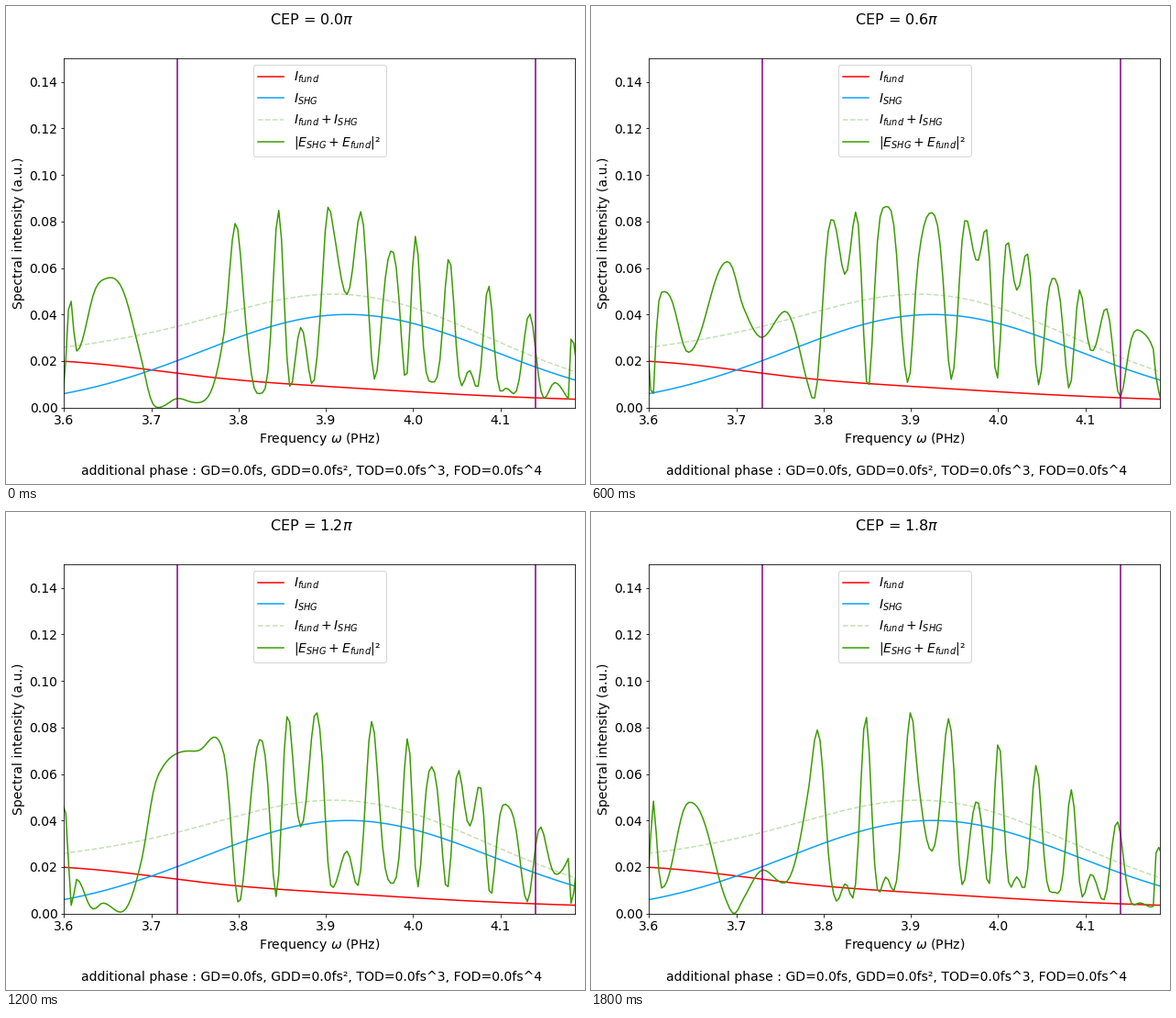
Recreate the animation shown at these times as a matplotlib script. Size 632x521 px, loop 2 s.

```python
import numpy as np
import matplotlib.pyplot as plt
from matplotlib.animation import FuncAnimation

W, H, DPI = 632, 521, 72
FRAMES, INTERVAL = 10, 200
LEFT, BOTTOM, AX_W, AX_H = 63.4, 437.7, 558, 380.5
GREEN = "#3a9a00"

plt.rcParams.update({"font.family": "DejaVu Sans", "font.size": 14})


def ease_through(x, points):
    """Smooth path through key points that is level at each turning point."""
    xk, yk = np.array(points).T
    h = np.diff(xk)
    d = np.diff(yk) / h
    left, right = d[:-1], d[1:]
    same = np.maximum(left * right, 0)
    inner = 2 * same / (abs(left) + abs(right)) * np.sign(left)
    m = np.concatenate([d[:1], inner, d[-1:]])
    i = np.clip(np.searchsorted(xk, x) - 1, 0, len(h) - 1)
    t = (x - xk[i]) / h[i]
    return (yk[i] * (1 + 2 * t) * (1 - t) ** 2
            + yk[i + 1] * t * t * (3 - 2 * t)
            + h[i] * (m[i] * t * (1 - t) ** 2 - m[i + 1] * t * t * (1 - t)))


# Turning points of the relative phase, in units of pi.
TURNS = [
    (3.5987, -.9), (3.605, -.25), (3.6081, .175), (3.6144, .531),
    (3.645, .045), (3.688, .6), (3.708, 1), (3.73, 1.144), (3.755, 1.065),
    (3.782, 1.4), (3.8095, 2.6), (3.825, 2.993), (3.8715, .612),
    (3.893, 1.4), (3.9085, 2.23), (3.924, 2.5), (3.976, .272),
    (4.0215, 2.986), (4.0645, .752), (4.107, 3.14), (4.163, .67),
    (4.1778, .88), (4.1809, 2.03), (4.1872, 1.6),
]

freq = 3.605 + .00313 * np.arange(-2, 187)
phase = ease_through(freq, TURNS)
u = freq - 3.6
fund = (.0199 * np.exp(-2.27 * u - 1.11 * u ** 2)
        + .001 * np.sin(21 * u) * np.exp(-6 * u))
shg = .04 * np.exp(-(freq - 3.925) ** 2 / .0557)


def interference(cep):
    return fund + shg + 2 * np.sqrt(fund * shg) * np.cos(np.pi * (cep - phase))


fig = plt.figure(figsize=(W / DPI, H / DPI), dpi=DPI, facecolor="white")
ax = fig.add_axes([LEFT / W, 1 - BOTTOM / H, AX_W / W, AX_H / H])

ax.plot(freq, fund, color="red", label=r"$I_{fund}$")
ax.plot(freq, shg, color="#0aa0fa", label=r"$I_{SHG}$")
ax.plot(freq, fund + shg, "--", color=GREEN, alpha=.3,
        label=r"$I_{fund}+I_{SHG}$")
total, = ax.plot(freq, interference(0), color=GREEN,
                 label=r"$|E_{SHG}+E_{fund}|$²")
for edge in (3.73, 4.14):
    ax.axvline(edge, color="purple")

ax.set(xlim=(3.6, 4.1858), ylim=(0, .15),
       xticks=np.arange(3.6, 4.15, .1), yticks=np.arange(0, .15, .02),
       xlabel=r"Frequency $\omega$ (PHz)", ylabel="Spectral intensity (a.u.)")
ax.legend(loc="upper center")

mid = (LEFT + 270) / W
title = fig.text(mid, 1 - 7 / H, "", ha="center", va="top", fontsize=16)
fig.text(mid, 7.2 / H,
         "additional phase : GD=0.0fs, GDD=0.0fs², TOD=0.0fs^3, FOD=0.0fs^4",
         ha="center", va="bottom")


def draw(i):
    cep = 2 * i / FRAMES
    total.set_ydata(interference(cep))
    title.set_text(rf"CEP = {cep:.1f}$\pi$")
    return total, title


anim = FuncAnimation(fig, draw, frames=FRAMES, interval=INTERVAL,
                     repeat=True, repeat_delay=0)
plt.show()
```
